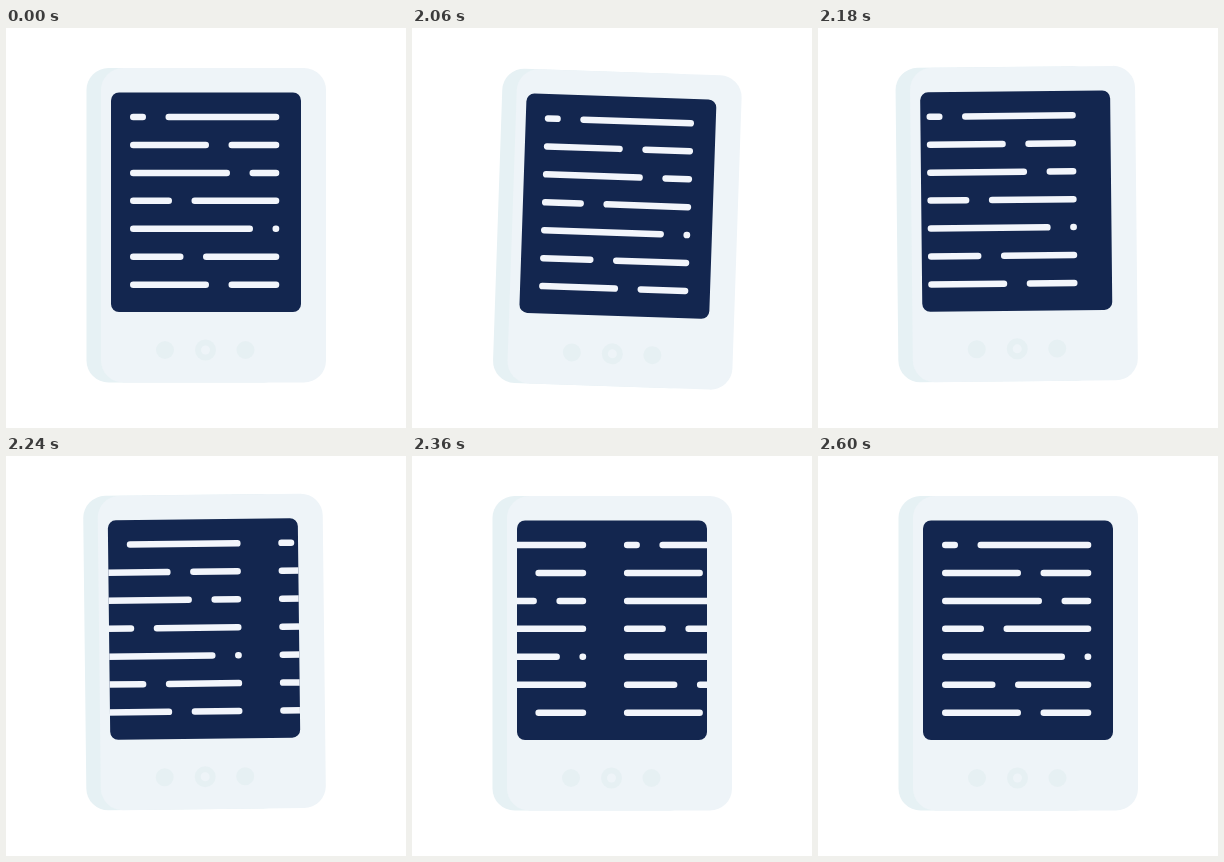
These frames come from a looping animation (400 by 400 pixels, 2630 ms). An HTML page:

```html
<!DOCTYPE html>
<html lang="en">
<head>
<meta charset="utf-8">
<title>E-reader page turn</title>
<style>
  html, body { margin: 0; width: 100%; height: 100%; overflow: hidden; background: #fff; }
  svg { display: block; width: 100%; height: 100%; }
</style>
</head>
<body>
<svg viewBox="0 0 400 400">
  <clipPath id="screen"><rect x="105" y="64.5" width="190" height="219.5" rx="8"/></clipPath>
  <g id="reader">
    <rect x="80.5" y="40" width="200" height="314.5" rx="22" fill="#e6f1f4"/>
    <rect x="95" y="40" width="225" height="314.5" rx="22" fill="#eef4f8"/>
    <g fill="#e6f0f3">
      <circle cx="159" cy="322" r="9"/>
      <circle cx="199.5" cy="322" r="10.5"/>
      <circle cx="239.5" cy="322" r="9"/>
    </g>
    <circle cx="199.5" cy="322" r="4.5" fill="#eef4f8"/>
    <g clip-path="url(#screen)">
      <rect x="100" y="60" width="200" height="230" fill="#13264f"/>
      <path id="text" fill="none" stroke="#f2f5fb" stroke-width="6.5" stroke-linecap="round"/>
    </g>
  </g>
</svg>
<script>
const LOOP = 2630, MOVE = 2030, STEP = 30;
const LEFT = 124, RIGHT = 273.3, GAP = 19.5, CAP = 3.25, PAGE = 187;
const wordEnds = [140, 203, 224, 166, 247, 177.5, 203];
const tilts = [0, 3, -1, 0]; // degrees, one key every 100 ms from 2000 ms

const reader = document.getElementById('reader');
const text = document.getElementById('text');

const ease = u => u * u * (3 - 2 * u);
const progress = (t, start, length) => ease(Math.min(1, Math.max(0, (t - start) / length)));

const dash = (from, to, y) => `M${from + CAP} ${y}H${to - CAP}`;
const page = shift => wordEnds.map((end, row) => {
  const y = 89 + row * 27.95;
  return dash(LEFT + shift, end + shift, y) + dash(end + GAP + shift, RIGHT + shift, y);
}).join('');
text.setAttribute('d', page(0) + page(PAGE));

function tiltAt(t) {
  let angle = 0;
  for (let i = 1; i < tilts.length; i++) {
    angle += (tilts[i] - tilts[i - 1]) * progress(t, 1900 + i * 100, 100);
  }
  return angle;
}

const start = performance.now();
function draw() {
  let t = (performance.now() - start) % LOOP;
  t = t < MOVE ? 0 : MOVE + Math.floor((t - MOVE) / STEP) * STEP;
  reader.setAttribute('transform', `rotate(${tiltAt(t)} 88 349)`);
  text.setAttribute('transform', `translate(${-PAGE * progress(t, 2100, 500)})`);
  requestAnimationFrame(draw);
}
draw();
</script>
</body>
</html>
```
